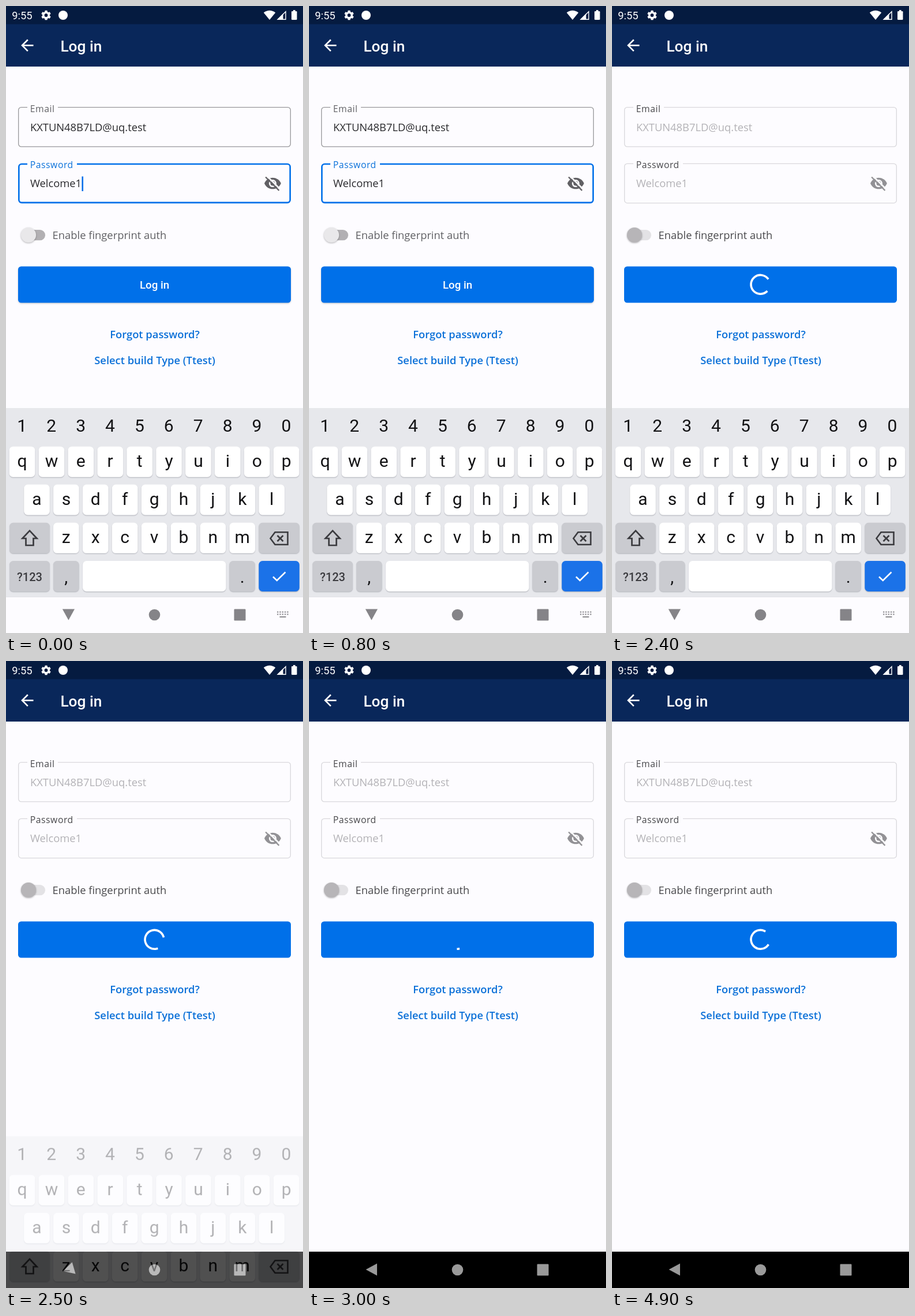
Recreate the animation shown at these times as an HTML page with a canvas. Size 515 by 1087 pixels, loop 5000 ms.

```html
<!DOCTYPE html>
<html lang="en">
<head>
<meta charset="utf-8">
<title>Log in</title>
<style>
html, body { margin: 0; width: 100%; height: 100%; overflow: hidden; background: #fdfcff; }
canvas { display: block; width: 515px; height: 1087px; }
</style>
</head>
<body>
<canvas id="stage"></canvas>
<script>
const W = 515, H = 1087, LOOP = 5000, STEP = 100;
const SUBMIT = 1900, HIDE = 2400, HIDE_TIME = 240;
const SPIN_START = 1767, SPIN_TIME = 1333;
const DP = 1.3114; // stage pixels per layout unit
const PAGE = '#fdfcff', BLUE = '#0070e9';
const SANS = '"Open Sans", sans-serif', ROBOTO = 'Roboto, sans-serif';
const BODY = 14 * DP + 'px ';

const dpr = window.devicePixelRatio || 1;

function prepare(canvas) {
  canvas.width = W * dpr;
  canvas.height = H * dpr;
  const c = canvas.getContext('2d');
  c.scale(dpr, dpr);
  return c;
}
const main = prepare(document.getElementById('stage'));
const layer = prepare(document.createElement('canvas'));
let ctx = main;

function rect(x, y, w, h, color, r = 0) {
  ctx.fillStyle = color;
  ctx.beginPath();
  ctx.roundRect(x, y, w, h, r);
  ctx.fill();
}

function disc(x, y, r, color) {
  ctx.fillStyle = color;
  ctx.beginPath();
  ctx.arc(x, y, r, 0, Math.PI * 2);
  ctx.fill();
}

function trace(points, closed) {
  ctx.beginPath();
  points.forEach(([x, y]) => ctx.lineTo(x, y));
  if (closed) ctx.closePath();
}

function poly(points, color) {
  trace(points, true);
  ctx.fillStyle = color;
  ctx.fill();
}

function line(points, color, width, closed = false) {
  trace(points, closed);
  ctx.strokeStyle = color;
  ctx.lineWidth = width;
  ctx.stroke();
}

function text(str, x, y, font, color, align = 'left', spacing = 0) {
  ctx.font = font;
  ctx.fillStyle = color;
  ctx.textAlign = align;
  ctx.letterSpacing = spacing + 'px';
  ctx.fillText(str, x, y);
}

function shadowed(color, blur, dy, draw) {
  ctx.save();
  ctx.shadowColor = color;
  ctx.shadowBlur = blur * dpr;
  ctx.shadowOffsetY = dy * dpr;
  draw();
  ctx.restore();
}

// CSS-like cubic Bezier easing with end points 0,0 and 1,1
function bezier(x1, y1, x2, y2) {
  const at = (a, b, u) => 3 * a * u * (1 - u) ** 2 + 3 * b * u * u * (1 - u) + u ** 3;
  return x => {
    if (x <= 0) return 0;
    if (x >= 1) return 1;
    let lo = 0, hi = 1;
    for (let i = 0; i < 24; i++) {
      const mid = (lo + hi) / 2;
      if (at(x1, x2, mid) < x) lo = mid; else hi = mid;
    }
    return at(y1, y2, lo);
  };
}
const headEase = bezier(0.3, 0, 0.1, 1);
const tailEase = bezier(0.5, 0, 0.15, 1);

function gear(x, y) {
  ctx.save();
  ctx.translate(x, y);
  for (let i = 0; i < 6; i++) {
    ctx.rotate(Math.PI / 3);
    poly([[-2.6, -5], [-1.9, -8.3], [1.9, -8.3], [2.6, -5]], '#fff');
  }
  ctx.restore();
  disc(x, y, 6.3, '#fff');
  disc(x, y, 2.9, '#051b40');
}

function statusBar() {
  rect(0, 0, W, 32, '#051b40');
  text('9:55', 10.3, 22.8, BODY + ROBOTO, '#fff');
  gear(69.5, 16);
  disc(99, 16, 8, '#fff');

  ctx.fillStyle = '#fff';
  ctx.beginPath();
  ctx.moveTo(457, 24);
  ctx.lineTo(446.8, 11.5);
  ctx.quadraticCurveTo(457, 4, 467.2, 11.5);
  ctx.fill();

  poly([[469.5, 24], [480.5, 13], [480.5, 24]], '#fff');
  line([[471.5, 23.3], [485, 9.8], [485, 23.3]], '#fff', 1.4, true);
  rect(495, 9, 9.5, 15, '#fff', 1.3);
  rect(498, 7, 3.6, 3, '#fff');
}

function header() {
  rect(0, 31.4, W, 73.5, '#09275a');
  line([[47.5, 68.3], [28, 68.3]], '#fff', 2 * DP);
  line([[37.8, 58.5], [28, 68.3], [37.8, 78.1]], '#fff', 2 * DP);
  text('Log in', 94.4, 78.5, `500 ${20 * DP}px ` + ROBOTO, '#fff');
}

function field(y, label, notchEnd, value, look) {
  const w = look.width, inset = w / 2;
  ctx.strokeStyle = look.border;
  ctx.lineWidth = w;
  ctx.beginPath();
  ctx.roundRect(21 + inset, y + inset, 473 - w, 69.5 - w, 4.8);
  ctx.stroke();
  rect(37, y - 2, notchEnd - 37, 6, PAGE);
  text(label, 41.7, y + 8.5, 12 * DP + 'px ' + SANS, look.label, 'left', 0.55);
  text(value, 41.9, y + 41.7, BODY + SANS, look.value);
}

function eyeOff(color) {
  ctx.save();
  ctx.translate(446.7, 291.8);
  ctx.scale(DP, DP);
  ctx.fillStyle = color;
  ctx.beginPath();
  ctx.moveTo(1, 12);
  ctx.bezierCurveTo(5, 2, 19, 2, 23, 12);
  ctx.bezierCurveTo(19, 22, 5, 22, 1, 12);
  ctx.fill();
  disc(12, 12, 5, PAGE);
  disc(12, 12, 3, color);
  line([[3.6, 1.4], [22.4, 20.2]], PAGE, 2);
  line([[2.6, 3.6], [20.4, 21.4]], color, 1.8);
  ctx.restore();
}

function toggle(busy) {
  rect(32, 388, 36, 14 * DP, busy ? '#e3e2e5' : '#b2b0b3', 7 * DP);
  shadowed('rgba(0,0,0,.3)', 3, 1, () => disc(39, 397, 10 * DP, busy ? '#b7b5b8' : '#e9e8ea'));
  text('Enable fingerprint auth', 80.6, 404, BODY + SANS, busy ? '#48484b' : '#5f5f63');
}

function spinner(t) {
  const turns = (t - SPIN_START) / SPIN_TIME;
  const phase = turns % 1;
  const head = headEase(phase * 2), tail = tailEase(phase * 2 - 1);
  const base = 90 * phase + 191.6 * turns + 6 - 90;
  const rad = Math.PI / 180;
  ctx.strokeStyle = '#fff';
  ctx.lineWidth = 3.6;
  ctx.lineCap = 'square';
  ctx.beginPath();
  ctx.arc(257.4, 482.8, 16.4, (base + 270 * tail) * rad, (base + 270 * head + 0.5) * rad);
  ctx.stroke();
  ctx.lineCap = 'butt';
}

function form(t, busy) {
  const idle = { border: '#98989b', width: DP, label: '#626266', value: '#29292c' };
  const active = { border: BLUE, width: 2 * DP, label: '#0b72da', value: '#29292c' };
  const off = { border: '#d9d8dc', width: DP, label: '#48484b', value: '#b3b2b6' };
  field(175, 'Email', 90, 'KXTUN48B7LD@uq.test', busy ? off : idle);
  field(272.7, 'Password', 123, 'Welcome1', busy ? off : active);
  eyeOff(busy ? '#929195' : '#616064');
  if (!busy && (t + 100) % 1000 < 500) rect(131.4, 295.5, 2 * DP, 25.5, BLUE);
  toggle(busy);

  const button = () => rect(21, 451.5, 473, 48 * DP, BLUE, 4 * DP);
  if (busy) {
    button();
    spinner(t);
  } else {
    shadowed('rgba(0,0,0,.2)', 3, 1.2, button);
    text('Log in', 257.5, 490, '500 18.7px ' + ROBOTO, '#fff', 'center');
  }
  const link = '600 ' + BODY + SANS;
  text('Forgot password?', 258, 575.6, link, '#0b70d8', 'center');
  text('Select build Type (Ttest)', 258, 621.4, link, '#0b70d8', 'center');
}

function key(x, y, w, label, color = '#fff', baseline = 35) {
  shadowed('rgba(60,64,80,.28)', 1.5, 1.2, () => rect(x, y, w, 53, color, 6.5));
  if (label) text(label, x + w / 2, y + baseline, '30px ' + ROBOTO, '#121214', 'center');
}

function keyboard() {
  const pitch = 50.9, size = 44.6, gray = '#cacbd0', ink = '#3b3b3f';
  rect(0, 697, W, H - 697, '#e7e8ec');
  [...'1234567890'].forEach((c, i) =>
    text(c, 27.8 + i * pitch, 738.3, '30px ' + ROBOTO, '#121214', 'center'));
  const row = (letters, x, y) => [...letters].forEach((c, i) => key(x + i * pitch, y, size, c));
  row('qwertyuiop', 5.7, 763.7);
  row('asdfghjkl', 31.2, 829.5);
  row('zxcvbnm', 82, 895.8);

  key(6, 895.8, 70, '', gray);
  line([[41, 909.7], [53.5, 923], [47.5, 923], [47.5, 935], [34.5, 935], [34.5, 923], [28.5, 923]], ink, 2.7, true);
  key(438.3, 895.8, 70.5, '', gray);
  line([[458.5, 923], [466.5, 912.3], [488.5, 912.3], [488.5, 933.7], [466.5, 933.7]], ink, 2.6, true);
  line([[470.5, 918], [480.5, 928]], ink, 2.6);
  line([[480.5, 918], [470.5, 928]], ink, 2.6);

  key(6, 962, 70, '', gray);
  text('?123', 41, 996.5, '500 20px ' + ROBOTO, ink, 'center');
  key(82, 962, size, ',', gray, 38);
  key(133, 962, 248.5, '');
  key(387.3, 962, size, '.', gray, 38);
  key(438.3, 962, 70.5, '', '#1b72e8');
  line([[463, 989.5], [469.8, 996], [484.5, 981.5]], '#fff', 2.6);
}

function navBar(dark, turn) {
  const color = dark ? '#9a9a9a' : '#858488';
  rect(0, 1024, W, 63, dark ? '#000' : PAGE);
  ctx.save();
  ctx.translate(108.4, 1055);
  ctx.rotate(turn * Math.PI / 2);
  poly([[-10.6, -9.6], [10.6, -9.6], [0, 9.8]], color);
  ctx.restore();
  disc(257.5, 1055.5, 9.8, color);
  rect(395.5, 1045.5, 20, 20, color, 1.2);
  if (dark) return;
  rect(0, 1024, W, 1, '#e2e2e6');
  for (let i = 0; i < 10; i++)
    rect(470 + (i % 5) * 4.3, 1049.5 + Math.floor(i / 5) * 4, 2.4, 2.2, '#929195');
  rect(474.5, 1058, 11, 2.2, '#929195');
}

// The keyboard fades as one flat layer while it slides down
function slideKeyboard(hide) {
  ctx = layer;
  keyboard();
  ctx = main;
  ctx.globalAlpha = (1 - hide) ** 2.15;
  ctx.drawImage(layer.canvas, 0, 305 * hide, W, H);
  ctx.globalAlpha = 1;
}

function draw(t) {
  const busy = t >= SUBMIT;
  const hide = Math.min(1, Math.max(0, (t - HIDE) / HIDE_TIME));
  rect(0, 0, W, H, PAGE);
  statusBar();
  header();
  form(t, busy);
  if (hide === 0) {
    keyboard();
    navBar(false, 0);
  } else {
    navBar(true, 1 - (1 - hide) ** 3.2);
    if (hide < 1) slideKeyboard(hide);
  }
}

function tick() {
  const t = performance.now() % LOOP;
  draw(Math.floor(t / STEP) * STEP);
  requestAnimationFrame(tick);
}
tick();
</script>
</body>
</html>
```
